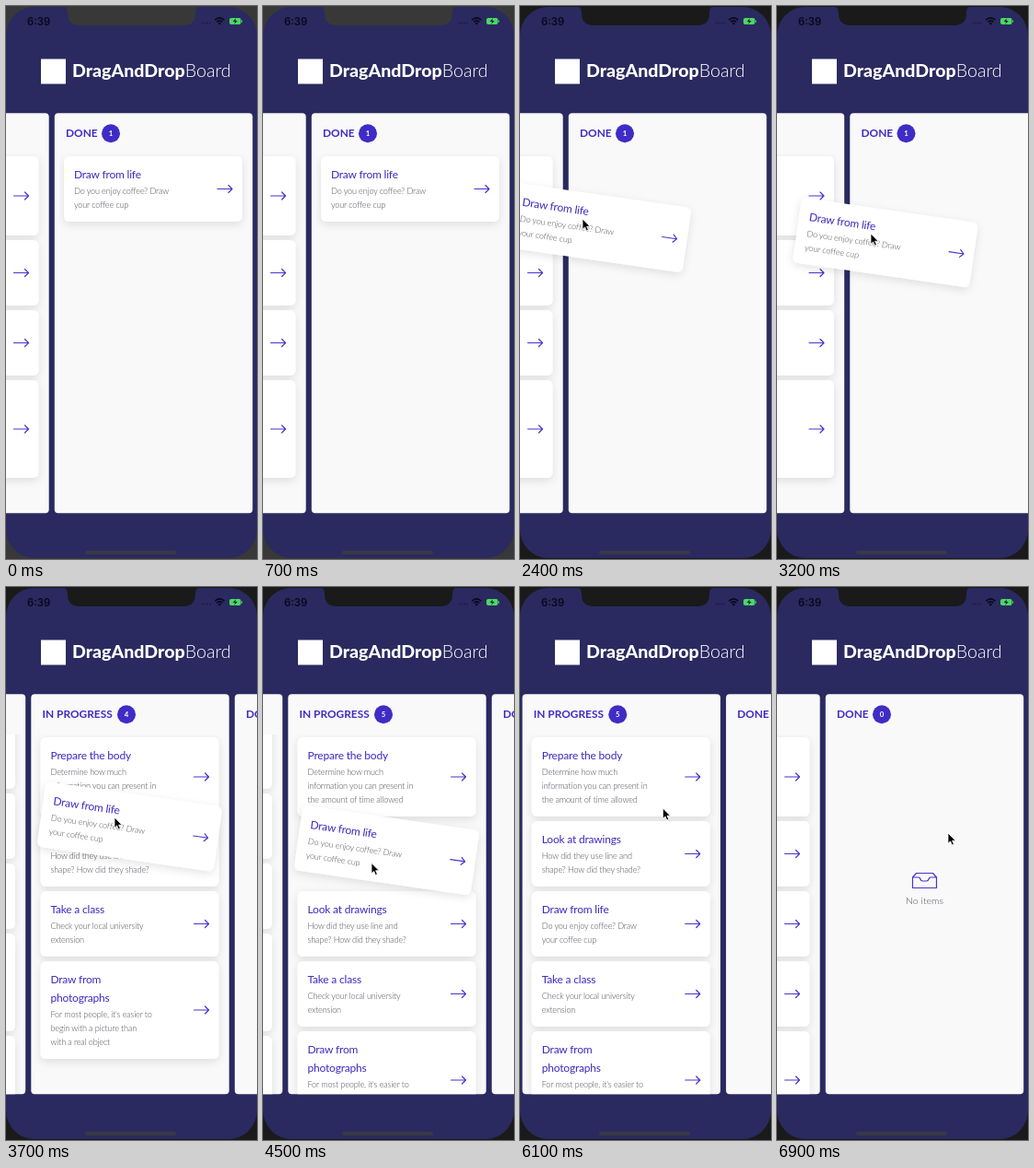
Animation, 273 px wide and 600 px high, one loop 7 s. Source, as an HTML page:

```html
<!DOCTYPE html>
<html lang="en">
<head>
<meta charset="utf-8">
<title>Board</title>
<style>
  html, body { margin: 0; width: 100%; height: 100%; overflow: hidden; background: #1a1a1a; }
  svg { display: block; width: 100vw; height: 100vh; }
  text { font-family: Lato, "Open Sans", sans-serif; }
  .brand { font-size: 19.6px; font-weight: 800; fill: #fff; }
  .brand .thin { font-weight: 300; }
  .head { font-size: 11.9px; font-weight: 700; fill: #3f2cc6; }
  .count { font-size: 7.8px; font-weight: 700; fill: #fff; text-anchor: middle; }
  .title { font-size: 12px; letter-spacing: -.2px; fill: #3d2abf; }
  .body { font-size: 9.1px; font-weight: 300; letter-spacing: -.15px; fill: #50505a; }
  .empty { font-size: 10.5px; font-weight: 300; fill: #50505a; text-anchor: middle; }
  .clock { font: 600 11.3px Inter, sans-serif; fill: #08081a; }
  .line { fill: none; stroke: #4934c9; stroke-width: 1.2; stroke-linecap: round; stroke-linejoin: round; }
</style>
</head>
<body>
<svg viewBox="0 0 273 600" preserveAspectRatio="none">
  <defs>
    <clipPath id="screen"><rect y="1" width="273" height="598" rx="31"/></clipPath>
    <clipPath id="list"><rect x="4" y="160" width="208" height="390.3"/></clipPath>
    <filter id="shadow" x="-15%" y="-30%" width="130%" height="170%">
      <feDropShadow dx="0" dy="3" stdDeviation="5" flood-color="#000" flood-opacity=".11"/>
    </filter>
  </defs>
  <rect class="bezel" width="273" height="600"/>
  <g clip-path="url(#screen)">
    <rect width="273" height="600" fill="#2a2a60"/>
    <rect x="38" y="57.5" width="27" height="27" fill="#fff"/>
    <text class="brand" x="72" y="77">DragAndDrop<tspan class="thin">Board</tspan></text>
    <g id="board"></g>
    <g id="drag"></g>
    <rect x="86" y="591" width="99" height="4" rx="2" fill="#393946"/>
  </g>
  <path class="bezel" d="M58 0C65 0 67 2 67 8C67 16 71 21 80 21H193C202 21 206 16 206 8C206 2 208 0 215 0Z"/>
  <text class="clock" x="23" y="20.5">6:39</text>
  <path d="M213.5 18.5h9" stroke="#1c1c47" stroke-width="1.8" stroke-linecap="round" stroke-dasharray="0 2.8"/>
  <g fill="none" stroke="#08081a" stroke-width="1.7">
    <path d="M227.3 15.2Q232.3 10.6 237.3 15.2"/><path d="M229.3 17.3Q232.3 14.6 235.3 17.3"/>
  </g>
  <circle cx="232.3" cy="19" r="1.3" fill="#08081a"/>
  <rect x="243" y="13" width="12.5" height="7" rx="2" fill="#4bd964"/>
  <rect x="256" y="15.2" width="1" height="2.6" rx=".5" fill="#4bd964"/>
  <path d="M250 13.3L246.7 17H249L248.3 19.7L251.8 16H249.4Z" fill="#16213a"/>
  <path id="cursor" d="M0 0V11.3L2.6 8.9L4.4 13L6.4 12.1L4.6 8.2H8.2Z" stroke="#fff" stroke-width=".8" stroke-linejoin="round"/>
</svg>
<script>
const LOOP = 7000, STEP = 100, LAG = 100;
const ENTER = 1000, PICK = 1600, INSERT = 4500, SWAP = 5000, RELEASE = 5300, DROP = 5600;
const GAP = 5, TOP = 163, PITCH = 221.5, PAGE = 196, TILT = 8.2;
const $ = id => document.getElementById(id);

function make(parent, tag, attrs = {}, text) {
  const el = document.createElementNS('http://www.w3.org/2000/svg', tag);
  for (const k in attrs) el.setAttribute(k, attrs[k]);
  if (text !== undefined) el.textContent = text;
  parent.append(el);
  return el;
}
const move = (el, x, y, turn = 0) =>
  el.setAttribute('transform', `translate(${x} ${y}) rotate(${turn})`);
const show = (el, on) => el.setAttribute('visibility', on ? 'visible' : 'hidden');
const mix = (a, b, u) => a + (b - a) * u;

// Eased 0 to 1 between two times
function ease(t, from, to) {
  const u = Math.min(1, Math.max(0, (t - from) / (to - from)));
  return u * u * (3 - 2 * u);
}

// Card with its top left corner at the origin
function card(parent, titles, lines) {
  const g = make(parent, 'g');
  const h = g.height = Math.round(20 + titles.length * 20 + lines.length * 15.3);
  make(g, 'rect', { width: 194, height: h, rx: 6, fill: '#fff', filter: 'url(#shadow)' });
  titles.forEach((s, i) => make(g, 'text', { class: 'title', x: 11, y: 24 + i * 19.5 }, s));
  const first = 21 + titles.length * 20;
  lines.forEach((s, i) => make(g, 'text', { class: 'body', x: 11, y: first + i * 15.2 }, s));
  make(g, 'path', { class: 'line', d: `M167 ${h / 2}h16m-4 -4l4 4l-4 4` });
  return g;
}

function column(name, badgeX) {
  const g = make($('board'), 'g');
  make(g, 'rect', { x: .3, y: 116.3, width: 215.4, height: 434, rx: 4, fill: '#f9f9f9' });
  make(g, 'text', { class: 'head', x: 12.5, y: 142 }, name);
  make(g, 'circle', { cx: badgeX, cy: 138.3, r: 10, fill: '#3f2cc6' });
  g.count = make(g, 'text', { class: 'count', x: badgeX, y: 141.1 });
  g.list = make(g, 'g', { 'clip-path': 'url(#list)' });
  return g;
}

function stack(cards, y = TOP) {
  for (const c of cards) {
    move(c, 10.5, y);
    y += c.height + GAP;
  }
}

const todo = column('TO DO', 75);
const doing = column('IN PROGRESS', 104);
const done = column('DONE', 61.5);
todo.count.textContent = 5;

// Only the right edges of these are ever in view
const short = () => card(todo.list, [''], ['', '']);
const tall = () => card(todo.list, ['', ''], ['', '', '']);
stack([short(), short(), short(), tall(), short()], 148);

const life = parent => card(parent, ['Draw from life'], ['Do you enjoy coffee? Draw', 'your coffee cup']);
const prepare = card(doing.list, ['Prepare the body'],
  ['Determine how much', 'information you can present in', 'the amount of time allowed']);
const look = card(doing.list, ['Look at drawings'], ['How did they use line and', 'shape? How did they shade?']);
const placed = life(doing.list);
const lesson = card(doing.list, ['Take a class'], ['Check your local university', 'extension']);
const photos = card(doing.list, ['Draw from', 'photographs'],
  ["For most people, it's easier to", 'begin with a picture than', 'with a real object']);
const start = life(done.list);
stack([start]);
const held = life($('drag'));
move(held, -97, -35.5);

const empty = make(done, 'g');
make(empty, 'path', { class: 'line',
  d: 'M95 315L99 310.5H117L121 315V326.5H95ZM95 315H101.5Q103 315 103.5 317Q104 319 106 319H110Q112 319 112.5 317Q113 315 114.5 315H121' });
make(empty, 'text', { class: 'empty', x: 108, y: 344 }, 'No items');

// Pointer moves: from, to, x, y
const moves = [
  [1000, 1500, 143, 191],
  [1600, 2350, 68, 231],
  [2500, 3150, 102, 247],
  [3200, 3600, 118, 250],
  [4200, 4800, 118, 349],
  [5400, 5800, 180, 239],
  [6000, 6300, 85, 243],
  [6450, 6900, 186, 267]
];
function pointer(t) {
  let x = 262, y = 245;
  for (const [from, to, nx, ny] of moves) {
    const u = ease(t, from, to);
    x = mix(x, nx, u);
    y = mix(y, ny, u);
  }
  return [x, y];
}

// The held card trails the pointer, then settles in its slot
function hold(t) {
  const [x, y] = pointer(t - LAG);
  const settle = ease(t, RELEASE, DROP);
  const tilt = TILT * (ease(t, PICK, PICK + 400) - settle);
  move($('drag'), mix(x + 16.5, 134.5, settle), mix(y + 10, 365.5, settle), tilt);
}

function draw(t) {
  const scroll = PAGE * (ease(t, 3110, 3500) - ease(t, 6000, 6450));
  [todo, doing, done].forEach((c, i) => move(c, scroll - 390.5 + i * PITCH, 0));

  const rest = [look, lesson, photos];
  if (t >= INSERT) rest.splice(t < SWAP ? 0 : 1, 0, placed);
  stack([prepare, ...rest]);
  doing.count.textContent = t < INSERT ? 4 : 5;
  done.count.textContent = t < INSERT ? 1 : 0;

  show(start, t < PICK);
  show(held, t >= PICK && t < DROP);
  show(placed, t >= DROP);
  show(empty, t >= INSERT);
  hold(t);

  show($('cursor'), t >= ENTER);
  move($('cursor'), ...pointer(t));
  for (const el of document.querySelectorAll('.bezel'))
    el.setAttribute('fill', t < ENTER ? '#383838' : '#1a1a1a');
}

const origin = performance.now();
function tick() {
  const t = (performance.now() - origin) % LOOP;
  draw(Math.floor(t / STEP) * STEP);
  requestAnimationFrame(tick);
}
draw(0);
requestAnimationFrame(tick);
</script>
</body>
</html>
```
